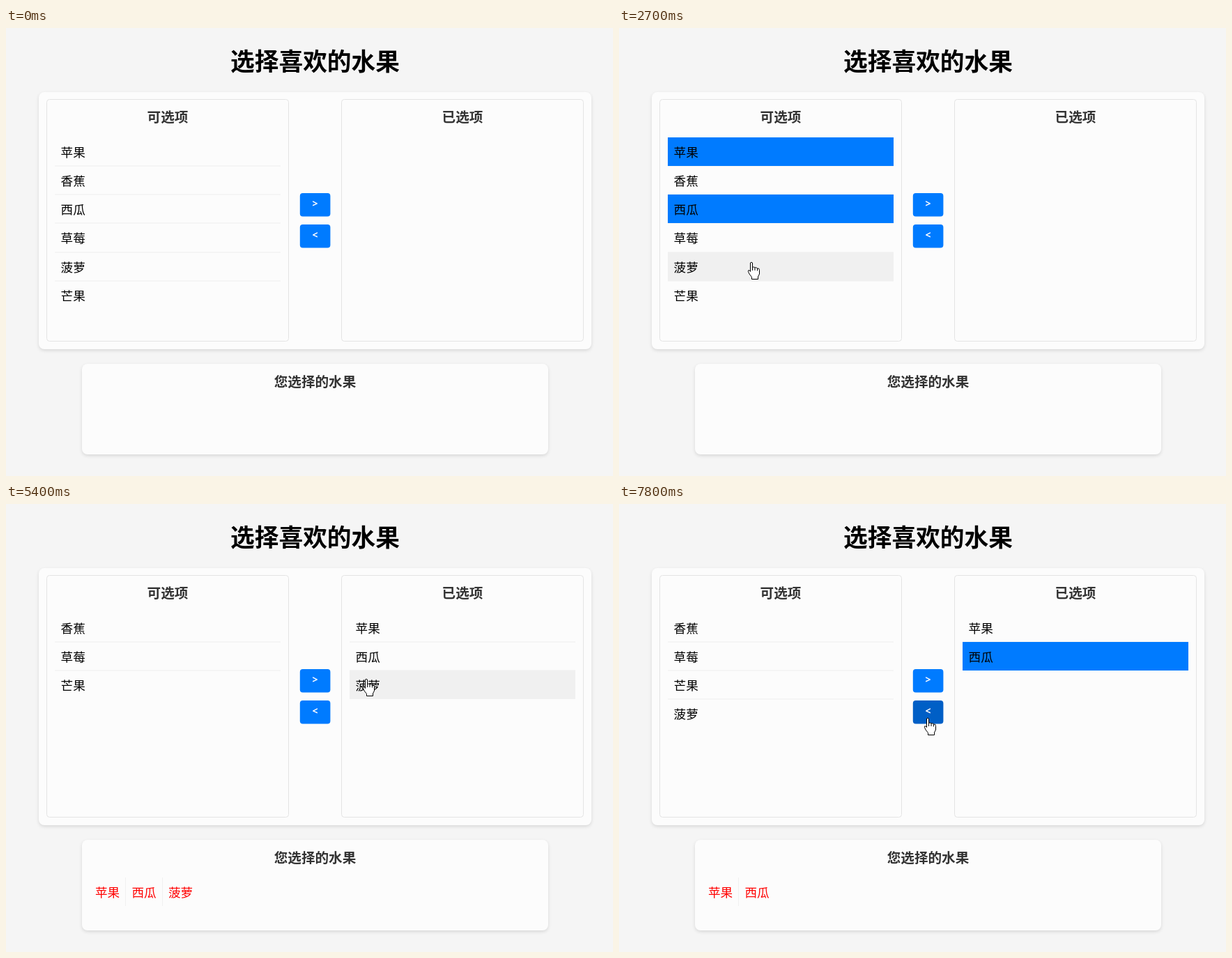
An HTML page with a canvas for the animation above (8 s loop, 871 by 643 pixels).

```html
<!DOCTYPE html>
<html lang="zh-CN">
<head>
<meta charset="utf-8">
<title>选择喜欢的水果</title>
<style>
html, body { margin: 0; width: 100%; height: 100%; overflow: hidden; background: #f5f5f5; }
canvas { display: block; }
</style>
</head>
<body>
<canvas id="stage" width="871" height="643"></canvas>
<script>
const ctx = document.getElementById('stage').getContext('2d');
const LOOP = 8000, STEP = 100, FADE = 300;
const FONT = '"Noto Sans CJK SC", "Noto Sans CJK", "Noto Sans", sans-serif';
const BLUE = '#007bff', LINE = '#f0f0f0', CARD = '#fcfcfc';
const LEFT = 70, RIGHT = 493, ROW_W = 324, ROW_H = 41, PITCH = 41.25;
const BTN = { x: 421.8, w: 43.6, h: 33.6 };
const BUTTONS = [{ y: 237, label: '>' }, { y: 282, label: '<' }];
const FRUITS = ['苹果', '香蕉', '西瓜', '草莓', '菠萝', '芒果'];

const CLICKS = [
  { at: 1400, on: '苹果' }, { at: 2100, on: '西瓜' }, { at: 3100, on: '菠萝' }, { at: 3900, on: '>' },
  { at: 5600, on: '菠萝' }, { at: 6200, on: '<' }, { at: 7400, on: '西瓜' }
];

// Each move eases to a stop; bow bends the way there
const ENTRY = { x: 820, y: 626 };
const MOVES = [
  { from: 400, to: 1200, x: 205, y: 172, bow: 0.9 },
  { from: 1400, to: 1800, x: 203, y: 255 },
  { from: 2200, to: 2900, x: 187, y: 356 },
  { from: 3100, to: 3300, x: 435, y: 301 },
  { from: 3300, to: 3700, x: 461, y: 255 },
  { from: 4000, to: 4300, x: 725, y: 146 },
  { from: 4700, to: 5400, x: 517, y: 251, bow: -0.9 },
  { from: 5500, to: 5900, x: 453, y: 307, bow: -0.3 },
  { from: 6100, to: 7100, x: 530, y: 219, bow: 0.4 },
  { from: 7400, to: 7700, x: 443, y: 307 }
];

const ease = k => k * k * (3 - 2 * k);

function pointerAt(t) {
  if (t < MOVES[0].from) return null;
  let p = ENTRY;
  for (const m of MOVES) {
    if (t < m.from) break;
    const k = ease(Math.min(1, (t - m.from) / (m.to - m.from)));
    const dx = m.x - p.x, dy = m.y - p.y, bend = 2 * k * (1 - k) * (m.bow || 0);
    p = { x: p.x + dx * k - dy * bend, y: p.y + dy * k + dx * bend };
  }
  return p;
}

function stateAt(t) {
  let left = FRUITS, right = [], picked = [];
  const isPicked = f => picked.includes(f), isFree = f => !isPicked(f);
  for (const { at, on } of CLICKS) {
    if (t < at) break;
    if (FRUITS.includes(on)) {
      picked.push(on);
      continue;
    }
    if (on === '>') [left, right] = [left.filter(isFree), right.concat(left.filter(isPicked))];
    else [left, right] = [left.concat(right.filter(isPicked)), right.filter(isFree)];
    picked = [];
  }
  return { left, right, picked };
}

const rowTop = i => Math.round(156.7 + PITCH * i);
const inside = (p, x, y, w, h) => p && p.x >= x && p.x < x + w && p.y >= y && p.y < y + h;
const overButton = (p, b) => inside(p, BTN.x, b.y, BTN.w, BTN.h);

// Hover level of a button, 0 to 1, rising and falling over FADE
function hoverLevel(b, t) {
  const dt = 50;
  let level = 0;
  for (let s = Math.max(0, t - 1500); s < t; s += dt) {
    level += (overButton(pointerAt(s), b) ? dt : -dt) / FADE;
    level = Math.min(1, Math.max(0, level));
  }
  return 1 - (1 - level) ** 2;
}

function box(x, y, w, h, r) {
  ctx.beginPath();
  ctx.roundRect(x, y, w, h, r);
}

function text(str, x, y, size, color, weight = 400, align = 'left') {
  ctx.font = `${weight} ${size}px ${FONT}`;
  ctx.textAlign = align;
  ctx.fillStyle = color;
  ctx.fillText(str, x, Math.round(y + size * 0.38));
}

const heading = (str, x, y, size = 19.6, color = '#333') => text(str, x, y, size, color, 700, 'center');

function card(x, y, w, h) {
  ctx.save();
  ctx.shadowColor = 'rgba(0,0,0,0.12)';
  ctx.shadowBlur = 5;
  ctx.shadowOffsetY = 2;
  ctx.fillStyle = CARD;
  box(x, y, w, h, 8);
  ctx.fill();
  ctx.restore();
}

function panel(x, title) {
  ctx.strokeStyle = '#e4e4e4';
  ctx.lineWidth = 1;
  box(x, 102.5, 347, 347, 4);
  ctx.stroke();
  heading(title, x + 173.5, 128);
}

function list(x, names, picked, p) {
  let hot = false;
  ctx.fillStyle = LINE;
  for (let i = 1; i < names.length; i++) ctx.fillRect(x, rowTop(i) - 0.5, ROW_W, 1);
  names.forEach((name, i) => {
    const y = rowTop(i), hover = inside(p, x, y, ROW_W, ROW_H);
    const chosen = picked.includes(name);
    hot = hot || hover;
    if (chosen || hover) {
      ctx.fillStyle = chosen ? BLUE : LINE;
      ctx.fillRect(x, y, ROW_W, ROW_H);
    }
    text(name, x + 8.6, 178 + PITCH * i, 17.6, '#000');
  });
  return hot;
}

function button(b, t) {
  const k = hoverLevel(b, t);
  ctx.fillStyle = `rgb(0,${Math.round(123 - 37 * k)},${Math.round(255 - 76 * k)})`;
  box(BTN.x, b.y, BTN.w, BTN.h, 4);
  ctx.fill();
  ctx.font = '700 14px "Open Sans", sans-serif';
  ctx.textAlign = 'center';
  ctx.fillStyle = '#fff';
  ctx.fillText(b.label, 443.5, b.y + 20);
}

function result(names) {
  names.forEach((name, i) => {
    const x = 128 + 52.5 * i;
    text(name, x, 557, 17.6, '#f00');
    if (i < names.length - 1) {
      ctx.fillStyle = LINE;
      ctx.fillRect(Math.round(x + 43), 536, 1, 41);
    }
  });
}

const HAND = new Path2D('M-1.5 1Q0 -.6 1.5 1V7.5Q3.5 6.2 5 8Q7 7 8.5 9Q11.5 8.4 11.5 11.5V17L9.5 21V24.5H.5V21.5L-3 17L-4.6 13.5Q-4.8 11.2 -3 11.8L-1.5 13.5Z');
const KNUCKLES = new Path2D('M1.5 7.5V12M5 8V12M8.5 9V12.5');
const ARROW = new Path2D('M.5 .5V16L4 12.6L6.6 18.4L9 17.4L6.5 11.7H11.5Z');

function pointer(p, hand) {
  const shape = hand ? HAND : ARROW;
  ctx.save();
  ctx.translate(Math.round(p.x), Math.round(p.y));
  ctx.fillStyle = '#fff';
  ctx.strokeStyle = '#000';
  ctx.lineWidth = 1;
  ctx.lineJoin = 'round';
  ctx.fill(shape);
  ctx.stroke(shape);
  if (hand) ctx.stroke(KNUCKLES);
  ctx.restore();
}

function draw(t) {
  const p = pointerAt(t), s = stateAt(t);
  ctx.fillStyle = '#f5f5f5';
  ctx.fillRect(0, 0, 871, 643);
  heading('选择喜欢的水果', 443.5, 48, 34.7, '#000');

  card(47, 92, 793, 369);
  panel(58.5, '可选项');
  panel(481.5, '已选项');
  const hotLeft = list(LEFT, s.left, s.picked, p);
  const hotRight = list(RIGHT, s.right, s.picked, p);
  BUTTONS.forEach(b => button(b, t));

  card(109, 482, 669, 130);
  heading('您选择的水果', 443.5, 507.5);
  result(s.right);

  if (p) pointer(p, hotLeft || hotRight || BUTTONS.some(b => overButton(p, b)));
}

const start = performance.now();
function tick() {
  const t = (performance.now() - start) % LOOP;
  draw(Math.floor(t / STEP) * STEP);
  requestAnimationFrame(tick);
}
tick();
</script>
</body>
</html>
```
